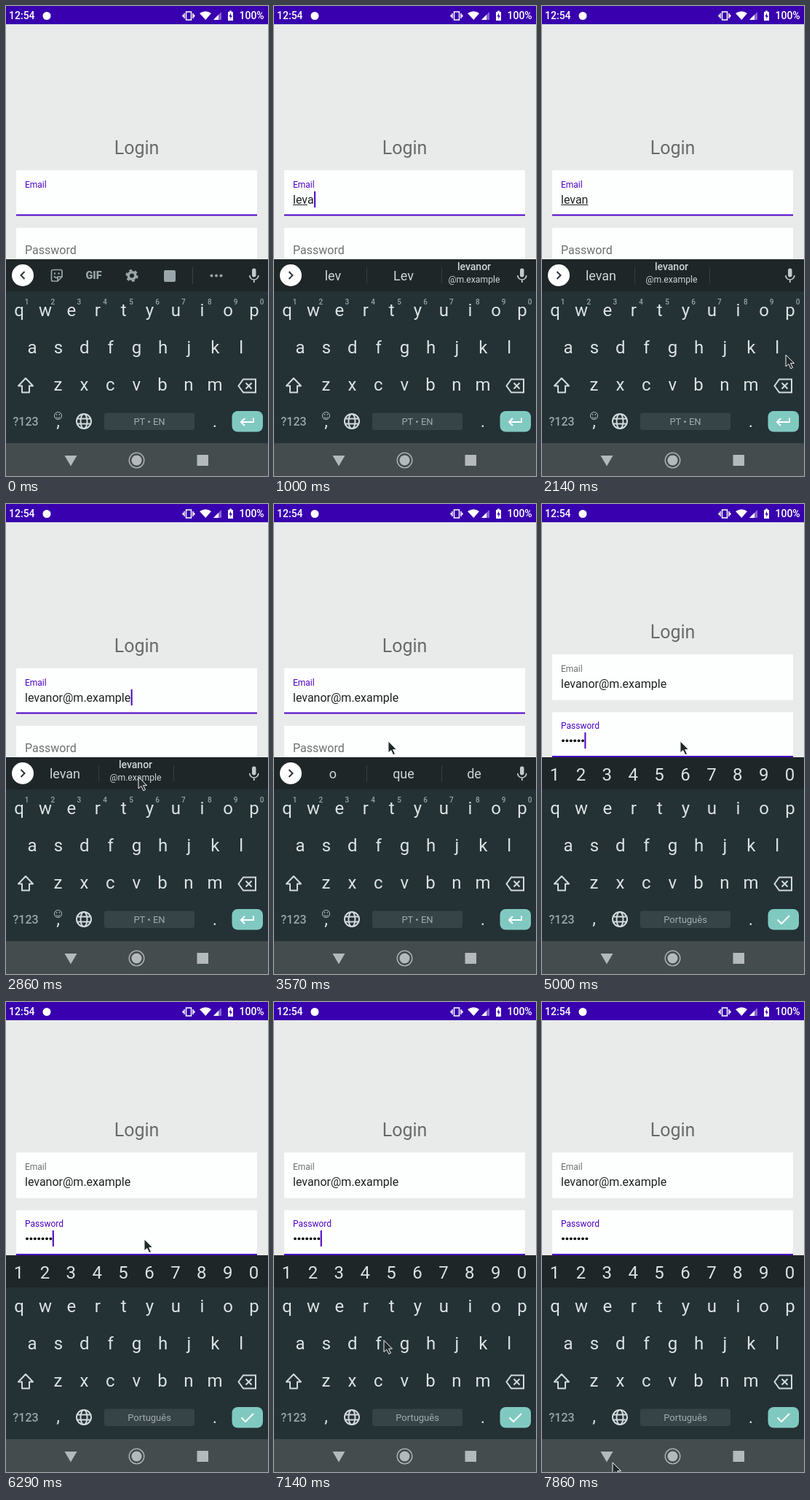
Animation, 360 px wide and 644 px high, one loop 8000 ms. Source, as an HTML page:

```html
<!DOCTYPE html>
<html lang="en">
<head>
<meta charset="utf-8">
<title>Login form</title>
<style>
  html, body { margin: 0; height: 100%; overflow: hidden; background: #e9ebea; }
  svg { display: block; width: 100vw; height: 100vh; font-family: Roboto, sans-serif; }
  .mid { text-anchor: middle; }
  .key { font-size: 24px; fill: #dce2e3; }
  .hint { font-size: 10px; font-weight: 500; fill: #98a4a8; }
  .word { font-size: 18px; fill: #cfd6d8; }
  .line { fill: none; stroke: #d3dadc; stroke-width: 2; }
  .soft { fill: #9aa6a9; }
  .input { font-size: 16px; fill: #1d1f1f; }
  .accent { fill: #4c00c4; }
  .label { font-size: 12px; }
</style>
</head>
<body>
<svg viewBox="0 0 360 644">
  <rect width="360" height="644" fill="#e9ebea"/>

  <g id="form">
    <text class="mid" x="179.5" y="203" font-size="25" fill="#696b6a">Login</text>
    <rect x="14" y="225" width="331" height="62.5" rx="1" fill="#fdfffe"/>
    <rect id="mailBar" class="accent" x="14" y="285.5" width="331" height="2"/>
    <text id="mailLabel" class="label" x="26" y="248.5">Email</text>
    <text id="mail" class="input" x="26" y="271"></text>
    <rect id="compose" x="26" y="272" height="1" fill="#1d1f1f"/>
    <rect x="14" y="304" width="331" height="63" rx="1" fill="#fdfffe"/>
    <text id="passHint" x="26" y="340" font-size="16" fill="#6d6f6e">Password</text>
    <g id="pass">
      <text class="label accent" x="26" y="327">Password</text>
      <rect class="accent" x="14" y="363.7" width="331" height="3"/>
      <g id="dots"></g>
    </g>
    <rect id="caret" class="accent" width="2" height="22"/>
  </g>

  <!-- status bar -->
  <rect width="360" height="25" fill="#3800ae"/>
  <g fill="#fff">
    <text x="4" y="18" font-size="14" font-weight="500">12:54</text>
    <circle cx="56" cy="13.5" r="5.5"/>
    <text x="320.5" y="18" font-size="14" font-weight="500">100%</text>
    <path d="M266 10Q274.500 4.500 282 10L274.300 19Z"/>
    <path d="M296 8V19H285Z" opacity=".4"/>
    <path d="M292 12V19H285Z"/>
    <path d="M305 8H307V6.500H310V8H312V20H305Z"/>
    <path d="M309 9.500L306.500 14.500H308.300V18L310.800 13H309Z" fill="#3800ae"/>
    <path d="M247.500 8H254.500V19H247.500ZM245 10V17M257 10V17M243.300 12V15M258.700 12V15" fill="none" stroke="#fff" stroke-width="1.5"/>
  </g>

  <!-- keyboard -->
  <rect y="347" width="360" height="252" fill="#243135"/>
  <rect y="347" width="360" height="44" fill="#1e2628"/>
  <g id="strip">
    <circle cx="23" cy="369" r="15" fill="#fff"/>
    <path id="chevron" d="M-2.500 -5L2.500 0L-2.500 5" fill="none" stroke="#2b3438" stroke-width="2"/>
    <g fill="#c3cacc">
      <rect x="338" y="359.500" width="5.500" height="12" rx="2.700"/>
      <path d="M334.800 369A6 6 0 0 0 346.800 369M340.800 375V379" fill="none" stroke="#c3cacc" stroke-width="1.7"/>
    </g>
    <g id="tools" class="soft">
      <path d="M64.500 361.500H75A2 2 0 0 1 77 363.500V371L71 377H64.500A2 2 0 0 1 62.500 375V363.500A2 2 0 0 1 64.500 361.500ZM71 377V371H77M66 370Q68 373.500 71 372" fill="none" stroke="#9aa6a9" stroke-width="1.7"/>
      <circle cx="67" cy="366.500" r="1.200"/><circle cx="72.500" cy="366.500" r="1.200"/>
      <text class="mid" x="120.500" y="374.300" font-size="14.500" font-weight="900">GIF</text>
      <circle cx="173" cy="369.500" r="4.800" fill="none" stroke="#9aa6a9" stroke-width="3.600"/>
      <circle cx="173" cy="369.500" r="7.300" fill="none" stroke="#9aa6a9" stroke-width="2.600" stroke-dasharray="3.82"/>
      <rect x="217" y="362" width="16" height="16" rx="2"/>
      <rect x="256" y="358" width="1" height="23" fill="#3a4548"/>
      <circle cx="282.500" cy="369.500" r="2"/><circle cx="289" cy="369.500" r="2"/><circle cx="295.500" cy="369.500" r="2"/>
    </g>
    <g id="words">
      <path d="M127.500 358V381M230.500 358V381" stroke="#353f42"/>
    </g>
  </g>
  <g id="digits"></g>
  <g id="hints"></g>
  <g id="keys"></g>

  <path class="line" d="M27 510L37 520.500H32V529.500H22V520.500H17Z" stroke-linejoin="round"/>
  <path class="line" d="M326 511.500H343V529.500H326L319.500 520.500ZM329.500 516.500L337.500 524.500M337.500 516.500L329.500 524.500"/>
  <text class="soft" x="9.500" y="575" font-size="16" font-weight="500">?123</text>
  <g id="smile" fill="none" stroke="#c3cacc">
    <circle cx="71.500" cy="561.500" r="5"/>
    <path d="M68.800 563Q71.500 566.500 74.200 563M69.700 559V560.800M73.300 559V560.800"/>
  </g>
  <text id="comma" class="key mid" x="71.500">,</text>
  <g class="line" stroke-width="1.600">
    <circle cx="107" cy="569" r="10"/>
    <ellipse cx="107" cy="569" rx="4.500" ry="10"/>
    <path d="M98 565.500H116M98 572.500H116"/>
  </g>
  <rect x="135" y="557.500" width="124" height="23.500" rx="3" fill="#364347"/>
  <text id="space" class="mid" x="197" y="574" font-size="13" fill="#a2acaf"></text>
  <text class="key mid" x="287" y="577">.</text>
  <rect x="310.500" y="555" width="42.500" height="28.500" rx="8" fill="#80c9c1"/>
  <path id="action" fill="none" stroke="#fff" stroke-width="2"/>

  <!-- navigation bar -->
  <rect y="599" width="360" height="45" fill="#444c4e"/>
  <g fill="#b4b9ba">
    <path d="M80.500 616H97.500L89 630.500Z"/>
    <circle cx="179.500" cy="622.500" r="7"/>
    <circle cx="179.500" cy="622.500" r="10.300" fill="none" stroke="#b4b9ba" stroke-width="1.300"/>
    <rect x="262.500" y="615" width="15.500" height="15"/>
  </g>

  <path id="pointer" d="M0 0V16L3.800 12.600L6.800 18.800L9.500 17.500L6.600 11.600H11.500Z" fill="#22292b" stroke="#f4f6f6"/>
</svg>
<script>
const LOOP = 8000, FPS = 7;
const USER = 'levanor', HOST = '@m.example';
const FOCUS = 26;

// [step, typed letters, letters already composed]
const TYPING = [[2, 1, 0], [3, 1, 1], [4, 2, 1], [5, 3, 2], [6, 3, 3],
  [7, 4, 3], [8, 4, 4], [11, 5, 4], [12, 5, 5]];
const ACCEPT = 20;
const DOTS = [28, 29, 31, 32, 33, 34, 36];
// [step, x, y]
const PATH = [[14, 348, 535], [15, 335, 478], [16, 199, 414], [17, 188, 385], [18, 182, 374],
  [22, 182, 374], [23, 172, 352], [25, 157, 325], [26, 190, 325],
  [47, 190, 325], [49, 172, 392], [51, 130, 535], [53, 99, 620], [54, 97, 628], [55, 97, 631]];

const $ = id => document.getElementById(id);

function add(parent, tag, attrs, text = '') {
  const el = document.createElementNS('http://www.w3.org/2000/svg', tag);
  for (const name in attrs) el.setAttribute(name, attrs[name]);
  el.textContent = text;
  return parent.appendChild(el);
}
const set = (id, attrs) => {
  for (const name in attrs) $(id).setAttribute(name, attrs[name]);
};
const show = (id, on) => set(id, { visibility: on ? 'visible' : 'hidden' });
const last = (list, step) => list.filter(row => row[0] <= step).pop();

function row(id, chars, x, y, cls = 'key mid') {
  [...chars].forEach((c, i) => add($(id), 'text', { class: cls, x: x + i * 35.9, y }, c));
}
row('keys', 'qwertyuiop', 18, 425);
row('keys', 'asdfghjkl', 36, 475.5);
row('keys', 'zxcvbnm', 71.5, 527);
row('digits', '1234567890', 17.5, 378.5);
row('hints', '1234567890', 28.5, 409, 'hint mid');

const dots = DOTS.map((_, i) => add($('dots'), 'circle', { cx: 29 + i * 5.4, cy: 343, r: 1.9 }));

const slots = [81, 178, 275].map(x => ({
  word: add($('words'), 'text', { class: 'word mid', x, y: 376 }),
  user: add($('words'), 'text', { class: 'word mid', x, y: 361.5, style: 'font-size:14px;font-weight:500' }),
  host: add($('words'), 'text', { class: 'word mid', x, y: 379, style: 'font-size:12.2px' })
}));

function suggest(words) {
  slots.forEach((slot, i) => {
    const isMail = words[i] === USER + HOST;
    slot.word.textContent = isMail ? '' : words[i];
    slot.user.textContent = isMail ? USER : '';
    slot.host.textContent = isMail ? HOST : '';
  });
}

function suggestions(step, composed) {
  if (step > ACCEPT) return ['o', 'que', 'de'];
  const part = USER.slice(0, composed);
  return composed > 4
    ? [part, USER + HOST, '']
    : [part, part.charAt(0).toUpperCase() + part.slice(1), USER + HOST];
}

function pointerAt(step) {
  const next = PATH.findIndex(p => p[0] > step);
  if (next < 0) return PATH[PATH.length - 1].slice(1);
  const [s0, x0, y0] = PATH[next - 1], [s1, x1, y1] = PATH[next];
  const k = (step - s0) / (s1 - s0);
  return [x0 + (x1 - x0) * k, y0 + (y1 - y0) * k];
}

function render(step) {
  const inPass = step >= FOCUS, accepted = step >= ACCEPT;
  const [, typed, composed] = last(TYPING, step) || [0, 0, 0];
  const count = DOTS.filter(s => s <= step).length;

  set('form', { transform: `translate(0 ${inPass ? -18.7 : 0})` });
  show('mailBar', !inPass);
  set('mailLabel', { fill: inPass ? '#6d6f6e' : '#4c00c4' });
  show('passHint', !inPass);
  show('pass', inPass);
  dots.forEach((dot, i) => dot.setAttribute('visibility', inPass && i < count ? 'visible' : 'hidden'));

  const mail = $('mail');
  mail.textContent = USER.slice(0, composed);
  set('compose', { width: accepted || !composed ? 0 : mail.getComputedTextLength() });
  mail.textContent = accepted ? USER + HOST : USER.slice(0, typed);

  // The caret restarts its one second blink at every edit.
  const edits = [-4, ...TYPING.filter((r, i) => i === 0 || r[1] !== TYPING[i - 1][1]).map(r => r[0]),
    ACCEPT, FOCUS, ...DOTS];
  const edit = edits.filter(s => s <= step).pop();
  show('caret', (step - edit) % FPS < FPS / 2);
  set('caret', inPass
    ? { x: 26 + count * 5.4, y: 331.7 }
    : { x: 26.5 + mail.getComputedTextLength(), y: 254 });

  const tools = composed === 0 && !accepted;
  show('strip', !inPass);
  show('tools', !inPass && tools);
  show('words', !inPass && !tools);
  set('chevron', { transform: `translate(23 369) scale(${tools ? -1 : 1} 1)` });
  suggest(suggestions(step, composed));

  show('digits', inPass);
  show('hints', !inPass);
  show('smile', !inPass);
  set('comma', { y: inPass ? 576 : 577 });
  $('space').textContent = inPass ? 'Português' : 'PT • EN';
  set('action', { d: inPass ? 'M323.500 569.500L329 575L340 564' : 'M340 564.500V570H323.500M328 565L323 570L328 575' });

  const visible = step >= PATH[0][0];
  show('pointer', visible);
  if (visible) set('pointer', { transform: `translate(${pointerAt(step)})` });
}

let shown = -1;
const start = performance.now();
function tick() {
  const t = (performance.now() - start) % LOOP;
  const step = Math.floor((t + 5) * FPS / 1000) % (LOOP * FPS / 1000);
  if (step !== shown) render(shown = step);
  requestAnimationFrame(tick);
}
tick();
</script>
</body>
</html>
```
